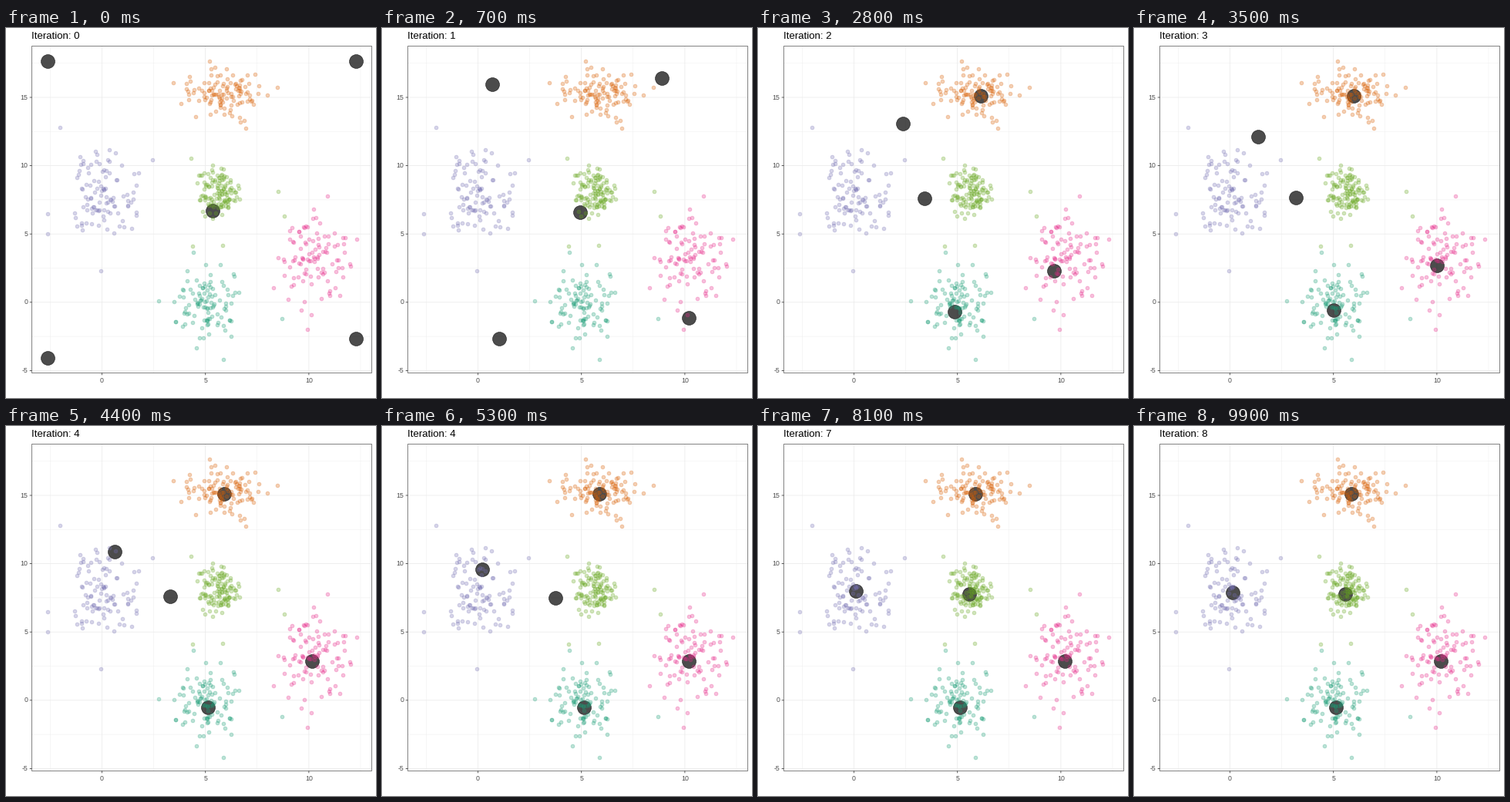
Write a matplotlib script that moves like this. It is 480 by 480 pixels and loops after 10 s.

```python
import numpy as np
import matplotlib.pyplot as plt
from matplotlib.animation import FuncAnimation
from matplotlib.patches import Rectangle

SIZE, DPI = 480, 72
FRAMES, INTERVAL, LAST = 100, 100, 8
LEFT, TOP, RIGHT, BOTTOM = 33.5, 23.5, 474.5, 447.5
GRID, DARK, LABEL = "#ebebeb", "#333333", "#4d4d4d"

plt.rcParams["font.family"] = "Liberation Sans"
rng = np.random.default_rng(7)

# colour, centre, spread, count, a few far points (stage pixels)
CLUSTERS = [
    ("#1b9e77", (262, 361), (24, 27), 102,
     [(242, 290), (197, 353), (281, 429), (357, 376)]),
    ("#d95f02", (284, 87), (28, 17), 110,
     [(263, 42), (216, 70), (351, 76), (310, 129)]),
    ("#7570b3", (128, 214), (24, 29), 100,
     [(69, 128), (53, 240), (53, 266), (122, 314), (189, 170)]),
    ("#e7298a", (397, 302), (23, 32), 100,
     [(416, 217), (454, 273), (346, 336), (390, 390)]),
    ("#66a61e", (274, 214), (14, 17), 120,
     [(239, 168), (241, 282), (280, 281), (352, 211), (360, 243)]),
]

# centroid position at each iteration; the last one holds
PATHS = [np.array(p) for p in [
    [(53.5, 42.7), (212, 96.8), (199.6, 117), (153.6, 145.4), (131, 177.5),
     (125.7, 205.8), (126.5, 212.3), (127.5, 215.5)],
    [(454.4, 42.7), (292, 83), (291, 88.4), (284.3, 88.4), (282, 88.4)],
    [(268, 236.5), (248, 241), (218.3, 222), (207.7, 219.5), (216.5, 222.5),
     (248.3, 223.5), (273.5, 218.5), (274.3, 217.7)],
    [(53.5, 428.2), (227, 384.4), (253.6, 369.6), (260.6, 365.3),
     (262.3, 364.6)],
    [(454.4, 403), (354, 354.8), (380.3, 317.8), (396, 305.4), (397.5, 304.6)],
]]


def px(x):
    return 124.5 + 26.84 * x


def py(y):
    return 355.8 - 17.72 * y


def cloud(centre, spread, count):
    """Normal scatter with its far tail cut off."""
    z = rng.normal(size=(count * 3, 2))
    z = z[np.hypot(*z.T) < 2.2][:count]
    return np.array(centre) + z * spread


def centroids(t):
    return [[np.interp(t, np.arange(len(p)), axis) for axis in p.T]
            for p in PATHS]


fig = plt.figure(figsize=(SIZE / DPI, SIZE / DPI), dpi=DPI, facecolor="white")
ax = fig.add_axes([0, 0, 1, 1])
ax.set(xlim=(0, SIZE), ylim=(SIZE, 0))
ax.axis("off")


def rule(xs, ys, color, width):
    ax.plot(xs, ys, color=color, lw=width, solid_capstyle="butt",
            snap=False, zorder=1)


def label(x, y, value, align):
    ax.text(x, y, str(value), size=8.8, color=LABEL, ha=align, va="baseline")


# minor, then major grid
for width, start in [(0.4, -2.5), (0.8, 0)]:
    for x in np.arange(start, 13, 5):
        rule([px(x)] * 2, [TOP, BOTTOM], GRID, width)
    for y in np.arange(start - (start == 0) * 5, 18, 5):
        rule([LEFT, RIGHT], [py(y)] * 2, GRID, width)

for x in range(0, 11, 5):
    rule([px(x)] * 2, [BOTTOM, BOTTOM + 2.75], DARK, 0.8)
    label(px(x), 460.2, x, "center")
for y in range(-5, 16, 5):
    rule([LEFT - 2.75, LEFT], [py(y)] * 2, DARK, 0.8)
    label(28.6, py(y) + 2.6, y, "right")

ax.add_patch(Rectangle((LEFT, TOP), RIGHT - LEFT, BOTTOM - TOP, fill=False,
                       ec=DARK, lw=0.6, snap=False, zorder=6))

title = ax.text(33, 14.2, "", size=13.2, color="black", va="baseline")
dots = ax.scatter(*np.transpose(centroids(0)), s=17.9 ** 2, c="black",
                  edgecolors="black", linewidths=0.7, alpha=0.7, zorder=3)

for color, centre, spread, count, far in CLUSTERS:
    pts = np.vstack([cloud(centre, spread, count), np.array(far) + 0.5])
    ax.scatter(*pts.T, s=4.9 ** 2, c=color, edgecolors=color,
               linewidths=0.7, alpha=0.3, zorder=4)


def draw(i):
    t = LAST * i / (FRAMES - 1)
    dots.set_offsets(centroids(t))
    title.set_text(f"Iteration: {round(t)}")
    return dots, title


anim = FuncAnimation(fig, draw, frames=FRAMES, interval=INTERVAL,
                     repeat=True, repeat_delay=0)
plt.show()
```
